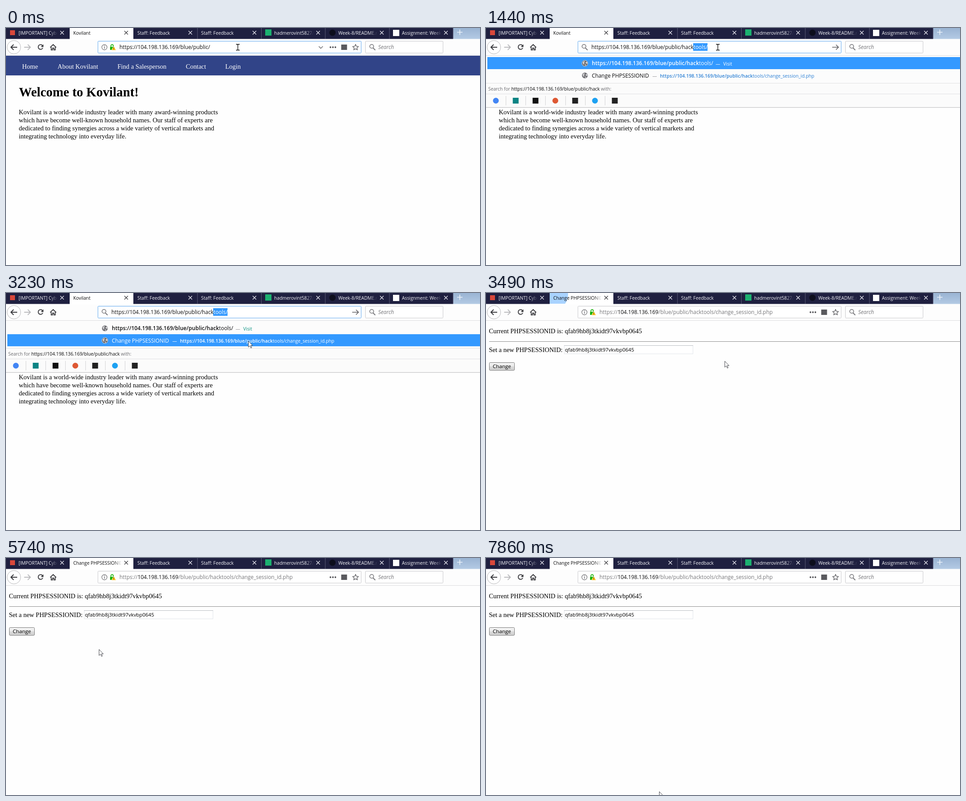
Animation, 1057 px wide and 530 px high, one loop 7990 ms. Source, as an HTML page:

```html
<!DOCTYPE html>
<html lang="en">
<head>
<meta charset="utf-8">
<title>Browser session</title>
<style>
html,body{margin:0;width:100%;height:100%;overflow:hidden;background:#fefefe}
svg{display:block}
#stage{width:100vw;height:100vh}
text{font-family:"Open Sans","Noto Sans",sans-serif;white-space:pre}
.serif{font-family:"Liberation Serif","Times New Roman",serif}
.head{font-weight:700}
.b{font-weight:600;letter-spacing:.01em}
.i{font-style:italic}
</style>
</head>
<body>
<svg id="stage" viewBox="0 0 1057 530" xmlns="http://www.w3.org/2000/svg">
<defs>
<linearGradient id="fadeDark"><stop stop-color="#1f2040" stop-opacity="0"/><stop offset="1" stop-color="#1f2040"/></linearGradient>
<linearGradient id="fadeLight"><stop stop-color="#fff" stop-opacity="0"/><stop offset="1" stop-color="#fff"/></linearGradient>
<linearGradient id="glass" x2="0" y2="1"><stop stop-color="#9ab4d3"/><stop offset="1" stop-color="#b3cae4"/></linearGradient>
<linearGradient id="btn" x2="0" y2="1"><stop stop-color="#f3f3f3"/><stop offset=".5" stop-color="#ebebeb"/><stop offset=".5" stop-color="#dcdcdc"/><stop offset="1" stop-color="#cfcfcf"/></linearGradient>
<linearGradient id="btnHot" x2="0" y2="1"><stop stop-color="#eaf6fd"/><stop offset=".5" stop-color="#d9f0fc"/><stop offset=".5" stop-color="#bee6fd"/><stop offset="1" stop-color="#a7d9f5"/></linearGradient>
<clipPath id="tabClip"><rect x="142" width="142" height="24"/></clipPath>
</defs>
<g id="page"></g>
<g id="pop"></g>
<g id="bar"></g>
<g id="ptr"></g>
</svg>
<script>
const LOOP = 7990;
const BASE = 'https://104.198.136.169/blue/public/';
const WORD = 'hacktools/';
const SESSION = 'qfab9hb8j3tkidt97vkvbp0645';
const INK = '#0c0c0d', HOT = '#3399ff', LINK = '#2a7fd4', TEAL = '#0f9484';
const BIG = 11.86, SMALL = 10.28;

// [start ms, letters typed]
const TYPED = [[0, 0], [740, 1], [870, 2], [1000, 3], [1440, 4]];
// [start ms, burst radius, opacity]
const BURST = [[0, 0, 0], [3490, 33, 1], [3620, 92, .5], [3740, 0, 0], [7210, 33, 1], [7330, 92, .5], [7450, 0, 0]];
// [start ms, x, y]
const POINTER = [
  [0, 517, 43], [2650, 527, 50], [2780, 542, 96], [2930, 543, 111], [3070, 540, 107],
  [3370, 537, 125], [3490, 532, 152], [3880, 524, 152], [4160, 486, 160], [4280, 456, 159],
  [4420, 463, 140], [4540, 486, 112], [4670, 465, 91], [4810, 430, 75], [4930, 345, 96],
  [5050, 245, 142], [5170, 188, 176], [5320, 211, 203], [5470, 210, 197], [5590, 211, 202],
  [5740, 207, 204], [5870, 191, 188], [6010, 165, 180], [6130, 115, 172], [6260, 70, 166],
  [6380, 46, 161], [7710, 134, 252], [7860, 386, 522]
];

const pick = (table, t) => table.filter(s => s[0] <= t).pop();
const text = (x, y, size, str, fill = INK, cls = '') =>
  `<text x="${x}" y="${y}" font-size="${size}" fill="${fill}" class="${cls}">${str}</text>`;
const rect = (x, y, w, h, fill, more = '') =>
  `<rect x="${x}" y="${y}" width="${w}" height="${h}" fill="${fill}" ${more}/>`;
const disc = (x, y, r, fill, more = '') =>
  `<circle cx="${x}" cy="${y}" r="${r}" fill="${fill}" ${more}/>`;
const line = (d, stroke, w = 1, more = '') =>
  `<path d="${d}" fill="none" stroke="${stroke}" stroke-width="${w}" ${more}/>`;
const bold = (a, b) => `<tspan class="b">${a}</tspan>${b}`;
const serif = (x, y, str, fill = '#000') => text(x, y, 14.48, str, fill, 'serif');

// Tabs: [title x, close x, title]
const TABS = [
  [28, 125, '[IMPORTANT] Cybersecurity'],
  [150, 268, 'Kovilant'],
  [293, 411, 'Staff: Feedback'],
  [435, 554, 'Staff: Feedback'],
  [598, 696, 'hadmerovint5827/Week-8'],
  [741, 838, 'Week-8/README.md at master'],
  [883, 981, 'Assignment: Week 8']
];

function tabs(t) {
  const [, r, alpha] = pick(BURST, t);
  let s = rect(0, 0, 997, 24.5, '#1f2040') + rect(997, 0, 60, 24.5, 'url(#glass)');
  s += [427, 569.5, 712, 855, 997].map(x => line(`M${x} 0V24`, '#5c5d78')).join('');
  s += rect(142, 0, 142, 26, '#fff');
  if (r) s += `<g clip-path="url(#tabClip)">${disc(150, 4, r, '#a9d3ff', `opacity="${alpha}"`)}</g>`;
  TABS.forEach(([x, close, title], i) => {
    const on = i === 1, w = close - 10 - x;
    if (on && t >= 3490) title = 'Change PHPSESSIONID';
    s += `<svg x="${x}" width="${w}" height="24">` +
      text(0, 14.8, SMALL, title, on ? INK : '#f4f4f8') +
      rect(w - 18, 0, 18, 24, `url(#fade${on ? 'Light' : 'Dark'})`) + '</svg>';
    s += line(`M${close - 4} 6.5l8 8m0-8l-8 8`, on ? '#3c3c40' : '#e6e6ee', 1.3);
  });
  s += rect(9, 5, 11, 11, '#d9483b') + rect(578, 3, 14, 14, '#1cb070');
  s += disc(728, 10.5, 7, '#0d0e1c') + rect(863, 4, 14, 14, '#fff');
  return s + line('M1006 9.5h12M1012 3.5v12', '#eef4fb', 1.6);
}

// Toolbar
const lens = (x, y) => line(`M${x + 1.5} ${y + 1.5}l5 5`, '#77777b', 2) +
  disc(x - 1.5, y - 2, 4.3, 'none', 'stroke="#77777b" stroke-width="1.6"');

function toolbar(t) {
  const n = pick(TYPED, t)[1], focus = t < 3370, open = n > 0 && focus;
  const loading = (t >= 3370 && t < 3490) || (t >= 7080 && t < 7210);
  let s = rect(0, 24.5, 1057, 37, '#fdfdfd') + line('M0 61.5H1057', '#dcdcde');
  s += disc(17.7, 43, 15, '#fff', 'stroke="#b5b5b8"');
  s += line('M25 43H11.5M17 37l-6 6l6 6', '#39393d', 2);
  s += line('M40.5 43H54M48.5 37l6 6l-6 6', '#b9b9bc', 1.8);
  s += loading
    ? line('M72 38l10 10m0-10l-10 10', '#39393d', 2)
    : line('M81.5 39.5A5.3 5.3 0 1 0 82 44.5', '#39393d', 1.9) + '<path d="M83.5 36.5v6h-6z" fill="#39393d"/>';
  s += line('M98.5 43.5l6.7-6.5l6.7 6.5M100.8 43v6h3v-4h3v4h3v-6', '#39393d', 1.8);

  s += rect(205, 29.5, 587, 26.5, '#fff', `rx="1.5" stroke="${focus ? '#5aa5ee' : '#c8c8cb'}"`);
  s += rect(801.5, 29.5, 173, 26.5, '#fff', 'rx="1.5" stroke="#c8c8cb"');
  s += lens(817, 43) + text(830, 47, BIG, 'Search', '#77777b', 'i');

  if (open) {
    const start = [437, 444, 450, 456, 462][n];
    s += lens(220, 43) + rect(start, 34, 494 - start, 17, HOT);
    s += text(235, 47, BIG, `${BASE + WORD.slice(0, n)}<tspan fill="#fff">${WORD.slice(n)}</tspan>`);
    return s + line('M772 43h14M780.5 37.5l5.5 5.5l-5.5 5.5', '#5e5e62', 1.6);
  }

  s += disc(219.5, 43, 5.8, 'none', 'stroke="#6a6a6e" stroke-width="1.2"');
  s += line('M219.5 42v4.2M219.5 39.3v1.6', '#6a6a6e', 1.4);
  s += rect(232, 42, 9, 7, '#19b30a', 'rx="1"') + line('M234 42v-2.2a2.6 2.6 0 0 1 5.2 0V42', '#19b30a', 1.7);
  s += '<path d="M240.3 40.5l5 9.2h-10z" fill="#ffbf1a" stroke="#fff" stroke-width=".6"/>';
  s += line('M240.3 43.5v3M240.3 47.4v1.2', '#5a4300', 1.1);
  if (focus) {
    s += text(253, 47, BIG, BASE) + line('M697.5 41l4.5 4.5l4.5-4.5', '#66666a', 1.4);
    if (t >= 450) s += line('M455.5 34V51', '#000');
  } else {
    s += text(253, 47, BIG, `https://<tspan fill="${INK}">104.198.136.169</tspan>/blue/public/hacktools/change_session_id.php`, '#77777a');
  }
  s += [723.5, 729, 734.5].map(x => disc(x, 43, 1.9, '#5a5a5e')).join('');
  s += rect(747.5, 37, 13, 12, '#5a5a5e');
  return s + line('M779.5 36.5l1.9 4.4l4.7.4l-3.6 3.1l1.1 4.6l-4.1-2.5l-4.1 2.5l1.1-4.6l-3.6-3.1l4.7-.4z',
    '#5a5a5e', 1.3, 'stroke-linejoin="round"');
}

// Suggestions: [title, link x, path]
const LIST = [
  ['Log in', 292, 'staff/login.php'],
  ['Change PHPSESSIONID', 388, ''],
  ['104.198.136.169', 348, "salesperson.php?id=1'"],
  ['Kovilant', 304.5, ''],
  ['Salesperson: Halen Dorve', 400, 'salesperson.php?id=1"'],
  ['Find a Salesperson', 361.5, "territories.php?userid='hvarnod'"],
  ['Find a Salesperson', 361.5, "territories.php?username='hvarnod'"],
  ['Contact Us', 318.5, 'contact.php'],
  ['Kovilant', 304.5, 'index.php']
];
const ENGINES = ['#4285f4', '#0c8484', '#111', '#de5833', '#222', '#1da1f2', '#222'];

const globe = y => disc(220.5, y, 6.6, '#6c6c70', 'stroke="#e4e4e6" stroke-width=".8"') +
  `<path transform="translate(220.5 ${y})" d="M-5-2l3-3l2 1l-2 3l1 2l-2 2zM1-1l3-3l2 3l-1 2l-3-1zM0 2l3 1l-2 3z" fill="#d8d8da"/>`;

function row(i, title, x, link, hot, color = LINK) {
  const y = 79 + 27.15 * i, base = y + 4.4;
  return (hot ? rect(3, y - 14, 1054, 27, HOT) : '') + globe(y) +
    text(236, base, BIG, title, hot ? '#fff' : INK) +
    text(x - 17, base + .6, SMALL, '—', hot ? '#fff' : '#8d8d91') +
    text(x, base + .6, SMALL, link, hot ? '#fff' : color);
}

function popup(t) {
  const n = pick(TYPED, t)[1];
  if (!n || t >= 3370) return '';
  const typed = BASE + WORD.slice(0, n), rest = WORD.slice(n);
  const second = t >= 3230;
  const up = t >= 1440 ? 217 : t >= 1300 ? 30 : 0;
  let s = rect(0, 62, 1057, 333 - up, '#fcfcfc');
  s += row(0, bold(typed, rest), 529, 'Visit', !second, TEAL);
  LIST.forEach(([title, x, path], i) => {
    if (i === 0 && n > 2) {
      s += row(1, 'Change PHPSESSIONID', 388, bold(typed, rest + 'change_session_id.php'), second);
    } else if (t < 1300) {
      s += i === 1
        ? row(2, title, x, 'Switch to Tab', false, TEAL) + rect(196, 128, 10, 8, '#a5a5a8', 'rx="1"') + rect(194, 135, 14, 2.5, '#a5a5a8')
        : row(i + 1, title, x, BASE + path);
    }
  });
  s += `<g transform="translate(0 ${-up})">` + rect(0, 340, 1057, 55, '#fbfbfb');
  s += [340.5, 364.5].map(y => line(`M0 ${y}H1057`, '#e0e0e2')).join('') + line('M0 394.7H1057', '#c4c4c6', 1.2);
  s += text(5, 357, SMALL, `Search for <tspan fill="${INK}">${typed}</tspan> with:`, '#6c6c70');
  ENGINES.forEach((c, i) => {
    const x = 22 + 44.2 * i;
    s += i === 0 || i === 3 || i === 5 ? disc(x, 379.5, 6.5, c) : rect(x - 6.5, 373, 13, 13, c);
    if (i < 6) s += line(`M${Math.round(x + 22) + .5} 369V390`, '#d2d2d4');
  });
  return s + '</g>';
}

// Pages
const NAV = [[36, 'Home'], [115, 'About Kovilant'], [248.5, 'Find a Salesperson'], [401, 'Contact'], [489, 'Login']];
const INTRO = [
  'Kovilant is a world-wide industry leader with many award-winning products',
  'which have become well-known household names. Our staff of experts are',
  'dedicated to finding synergies across a wide variety of vertical markets and',
  'integrating technology into everyday life.'
];

function page(t) {
  if (t < 3490) {
    return rect(0, 62, 1057, 44, '#314488') +
      NAV.map(([x, s]) => serif(x, 90.5, s, '#fff')).join('') +
      text(28.8, 153, 28.8, 'Welcome to Kovilant!', '#000', 'serif head') +
      INTRO.map((s, i) => serif(28.5, 192.5 + 18 * i, s)).join('');
  }
  const hot = t >= 6380 && t < 7710;
  return serif(6.5, 90, 'Current PHPSESSIONID is: ' + SESSION) +
    line('M7 108.5H1057', '#8a8a8a') +
    serif(6.5, 131.5, 'Set a new PHPSESSIONID:') +
    rect(174.5, 117.5, 287, 18.5, '#fff', 'stroke="#e2e5ea"') + line('M174 117.5H462', '#b9bcc2') +
    text(176, 131, 11.35, SESSION, '#000') +
    rect(7.5, 155.5, 56, 17.5, `url(#btn${hot ? 'Hot' : ''})`, `rx="2" stroke="${hot ? '#3c7fb1' : '#777'}"`) +
    text(15, 168.3, 11.6, 'Change', '#000');
}

function pointer(t) {
  const [, x, y] = pick(POINTER, t);
  const shape = t < 2780
    ? line('M-4-6.5h3l1 1l1-1h3M-4 6.5h3l1-1l1 1h3M0-6V6', '#000', 1.3)
    : '<path d="M.5.5V14L3.7 11L6 16L8 15.2L5.8 10.4H10z" fill="#fff" stroke="#33343a" stroke-width=".9"/>';
  return `<g transform="translate(${x} ${y})">${shape}</g>`;
}

const LAYERS = { page, pop: popup, bar: t => toolbar(t) + tabs(t), ptr: pointer };
const shown = {};

function tick() {
  const t = performance.now() % LOOP;
  for (const id in LAYERS) {
    const markup = LAYERS[id](t);
    if (markup !== shown[id]) document.getElementById(id).innerHTML = shown[id] = markup;
  }
  requestAnimationFrame(tick);
}
tick();
</script>
</body>
</html>
```
